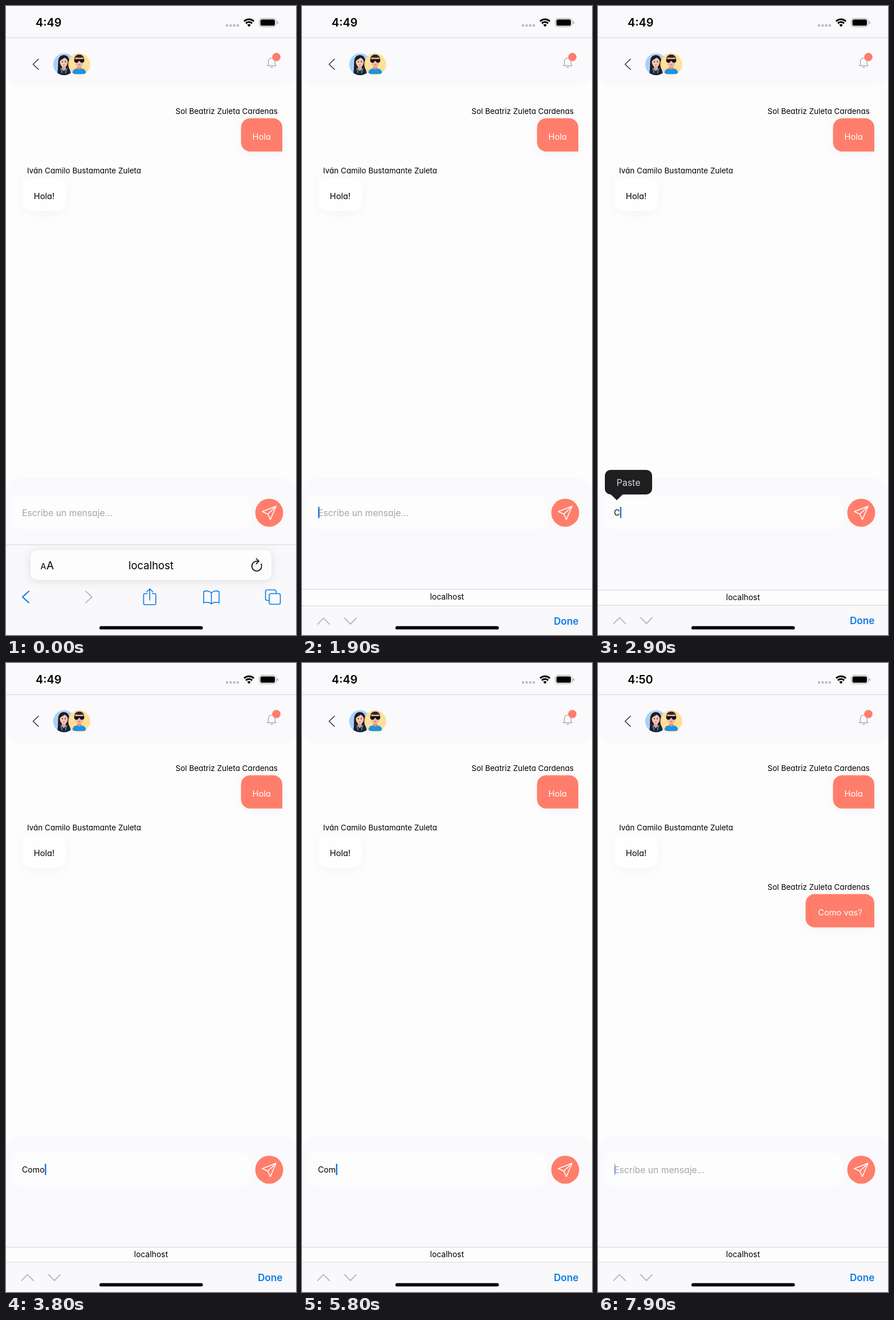
Animation of 509 by 1101 pixels, one loop 8 s. Source, as an HTML page:

```html
<!DOCTYPE html>
<html lang="es">
<head>
<meta charset="utf-8">
<title>Chat</title>
<style>
  html, body { margin: 0; width: 100%; height: 100%; overflow: hidden; background: #fefdfe; }
  svg { display: block; width: 100%; height: 100%; font-family: Inter, "Open Sans", sans-serif; }
  text { white-space: pre; }
  .app { font-feature-settings: "cv11"; }
  .name { font-size: 13.5px; }
  .msg { font-size: 14.7px; }
  .mid { text-anchor: middle; }
  .end { text-anchor: end; }
  .line { fill: none; stroke-width: 2; stroke-linecap: round; stroke-linejoin: round; }
  .thin { stroke-width: 1.6; }
  .blue { stroke: #0b7be8; }
  .grey { stroke: #bdbcc1; }
  .panel { fill: #faf9fb; }
  .coral { fill: #ff7e6b; }
  .bubble { filter: drop-shadow(0 4px 9px rgba(50, 40, 80, .05)); }
  .tip text { font-size: 16px; fill: #d4d4d6; }
  .tip { fill: #1f1f21; }
</style>
</head>
<body>
<svg viewBox="0 0 509 1101" preserveAspectRatio="none">
  <defs>
    <clipPath id="clipA"><circle cx="102" cy="102" r="19.2"/></clipPath>
    <clipPath id="clipB"><circle cx="128.5" cy="102" r="19.2"/></clipPath>
  </defs>
  <rect width="509" height="1101" fill="#fefdfe"/>

  <!-- status bar and header -->
  <path class="panel" d="M0 0h509v115a27 27 0 0 1-27 26H27a27 27 0 0 1-27-26z"/>
  <rect y="55" width="509" height="1" fill="#d6d5d8"/>
  <text id="clock" x="52" y="36" font-size="19.8" font-weight="600">4:49</text>
  <g fill="#b9b8bc">
    <circle cx="388" cy="34" r="2.2"/><circle cx="394.3" cy="34" r="2.2"/>
    <circle cx="400.6" cy="34" r="2.2"/><circle cx="406.9" cy="34" r="2.2"/>
  </g>
  <path d="M418 26.8a12 12 0 0 1 17 0M421 30.4a7.7 7.7 0 0 1 11 0" fill="none" stroke="#000" stroke-width="3"/>
  <path d="M426.5 36.4l-3.1-3.3a4.4 4.4 0 0 1 6.2 0z"/>
  <rect x="444.5" y="21.5" width="29.5" height="15" rx="4.5" fill="none" stroke="#acabaf"/>
  <rect x="446.5" y="23.5" width="25.5" height="11" rx="2.8"/>
  <path d="M475.5 26.5a2.5 2.5 0 0 1 0 5z" fill="#acabaf"/>

  <path class="line thin" d="M57 93l-9.5 9 9.5 9" stroke="#2b3848"/>

  <g clip-path="url(#clipA)">
    <rect x="82" y="82" width="40" height="40" fill="#a8d0fa"/>
    <path d="M90 118c2-8 1-14 1.500-20 .5-8 4-12 10-12s9.500 4 10 12c.5 6 0 12 2 20z" fill="#1d1c22"/>
    <path d="M90 123c0-8 4-12 12-12s13 4 13 12z" fill="#22232b"/>
    <path d="M98 104h7v7l-3.500 3-3.500-3z" fill="#e3a18a"/>
    <ellipse cx="101.500" cy="98" rx="7" ry="9" fill="#f4c4b2"/>
    <path d="M94 97c0-7 4-9.500 7.500-9.500s7.500 2.500 7.500 9.500c-1.500-3-3-5-6-6.500-2.500 2-6 3-9 6.500z" fill="#1d1c22"/>
    <path d="M98.200 97.500h1.600M103.400 97.500h1.600" stroke="#2b2226" stroke-width="1.800"/>
    <path d="M100 103h3.200" stroke="#b8584f"/>
    <path d="M96.500 108.500c0 4 1 6 2.500 9M106.500 108.500c0 4-1 6-2.500 9" fill="none" stroke="#2b8fe6" stroke-width="2"/>
  </g>
  <g clip-path="url(#clipB)">
    <rect x="109" y="82" width="40" height="40" fill="#ffdf99"/>
    <path d="M116.500 119c0-7 3-10 12-10s12 3 12 10z" fill="#1b93e4"/>
    <path d="M125 103h7v6.500l-3.500 2-3.500-2z" fill="#dd9579"/>
    <ellipse cx="128.500" cy="97" rx="7.600" ry="9.500" fill="#f2b89c"/>
    <path d="M120.500 94.500c-1-7 3-9.500 8-9.500s9 2.500 8 9.500l-2-4.500c-4 1-8 1-12 0z" fill="#31262a"/>
    <path d="M119.700 93h17.600v2.800a3.900 3.900 0 0 1-7.700.4h-2.200a3.900 3.900 0 0 1-7.700-.4z" fill="#111116"/>
    <path d="M126.500 102.800h4" stroke="#a9574b"/>
  </g>

  <path class="line" d="M458.800 104.500l1.700-2.500v-5a5.800 5.800 0 0 1 11.600 0v5l1.700 2.500zM464.500 107.300h3.600" stroke="#a6a8af" style="stroke-width:1.300"/>
  <circle class="coral" cx="474.500" cy="89.300" r="7.300"/>

  <!-- conversation -->
  <g class="app">
    <text class="name end" x="477" y="189">Sol Beatriz Zuleta Cardenas</text>
    <path class="bubble coral" d="M428.500 196.500h40.500a16 16 0 0 1 16 16v42.200h-56.500a16 16 0 0 1-16-16v-26.200a16 16 0 0 1 16-16z"/>
    <text class="msg mid" x="448.700" y="234" fill="#fff">Hola</text>

    <text class="name" x="37" y="293">Iván Camilo Bustamante Zuleta</text>
    <path class="bubble" fill="#fefefe" d="M28 300.500h60a18 18 0 0 1 18 18v22.500a18 18 0 0 1-18 18h-42a18 18 0 0 1-18-18z"/>
    <text class="msg mid" x="67" y="337.500">Hola!</text>

    <g id="reply">
      <text class="name end" x="477" y="397">Sol Beatriz Zuleta Cardenas</text>
      <path class="bubble coral" d="M380.300 404.500h88.700a16 16 0 0 1 16 16v42.200h-104.700a16 16 0 0 1-16-16v-26.200a16 16 0 0 1 16-16z"/>
      <text class="msg mid" x="425" y="442" fill="#fff">Como vas?</text>
    </g>
  </g>

  <!-- composer -->
  <path class="panel" d="M0 1101V853a27 27 0 0 1 27-27h455a27 27 0 0 1 27 27v248z"/>
  <rect x="10" y="857" width="420" height="59" rx="19" fill="#fefdfe"/>
  <g class="app">
    <text id="hint" x="28" y="892.500" font-size="15.700" fill="#a5a4a9">Escribe un mensaje...</text>
    <text id="draft" x="28" y="892" font-size="14.200"></text>
  </g>
  <rect id="caret" y="876.500" width="2.400" height="20" rx="1" fill="#1475dc"/>
  <circle class="coral" cx="462" cy="887" r="24.500"/>
  <path class="line thin" d="M474 875.500l-24 9.500 9.500 4.500 4.500 9.500zM474 875.500l-14.500 14" stroke="#fff"/>

  <!-- popups -->
  <g class="tip" id="paste">
    <path d="M22 812h63a10 10 0 0 1 10 10v23a10 10 0 0 1-10 10h-41.500l-10.500 10-10.500-10h-.5a10 10 0 0 1-10-10v-23a10 10 0 0 1 10-10z"/>
    <text class="mid" x="53.500" y="839.500">Paste</text>
  </g>
  <g class="tip" id="suggest">
    <path d="M35 812h67a10 10 0 0 1 10 10v23a10 10 0 0 1-10 10h-23l-10.500 10-10.500-10h-23a10 10 0 0 1-10-10v-23a10 10 0 0 1 10-10z"/>
    <text class="mid" x="68.500" y="839.500">Como</text>
  </g>

  <!-- browser bar -->
  <g id="bar">
    <rect y="943" width="509" height="240" fill="#f9f8fa"/>
    <rect id="strip" y="943" width="509" height="240" fill="#fefdfe"/>
    <rect y="942.500" width="509" height="1" fill="#d4d3d7"/>
  </g>
  <g id="capsule">
    <rect x="43" y="952.500" width="423" height="52" rx="12" fill="#fefdfe" style="filter:drop-shadow(0 2px 8px rgba(0,0,0,.11))"/>
    <text x="60.500" y="986" font-size="14.500">A</text>
    <text x="71" y="986" font-size="19">A</text>
    <path class="line thin" d="M447.800 976.500a8.600 8.600 0 1 1-7.800-4.700h3M439.300 967.200l4.600 4.600-4.600 4.600" stroke="#000"/>
  </g>
  <g id="tools" class="line">
    <path class="blue" d="M40 1024.500l-11 10 11 10"/>
    <path class="grey" d="M140 1024.500l11 10-11 10"/>
    <g class="blue thin">
      <path d="M248 1028.500h-4a2.500 2.500 0 0 0-2.500 2.500v14.500a2.500 2.500 0 0 0 2.500 2.500h16.500a2.500 2.500 0 0 0 2.500-2.500v-14.500a2.500 2.500 0 0 0-2.500-2.500h-4M252.300 1040v-19.500M247 1025.500l5.300-5.300 5.300 5.300"/>
      <path d="M360.500 1027.500c-3-4-10-4.500-13.500-2.500v20c4-2 10.500-1.500 13.500 1.500 3-3 9.500-3.500 13.500-1.500v-20c-3.500-2-10.500-1.500-13.500 2.500zv18.500"/>
      <path d="M462 1040.500h-3.500a3 3 0 0 1-3-3v-12.500a3 3 0 0 1 3-3h12.500a3 3 0 0 1 3 3v3.500"/>
      <rect x="462" y="1028.500" width="19.500" height="18.800" rx="3"/>
    </g>
  </g>
  <g id="site"><text class="mid" font-size="18.500">localhost</text></g>

  <!-- keyboard accessory -->
  <g id="accessory">
    <rect y="1049" width="509" height="110" fill="#f9f8fa"/>
    <rect y="1048.500" width="509" height="1" fill="#d4d3d7"/>
    <path class="line grey" d="M27.500 1081l10.300-10.500 10.300 10.500M74.700 1070.500l10.300 10.500 10.300-10.500"/>
    <text class="end" x="485.500" y="1082" font-size="17.200" font-weight="600" fill="#0b7be8">Done</text>
  </g>
  <rect x="164" y="1085.500" width="181.500" height="5.800" rx="2.900"/>
</svg>

<script>
  const LOOP = 8000, STEP = 100;
  const el = {};
  for (const id of ['clock', 'reply', 'hint', 'draft', 'caret', 'paste', 'suggest',
    'bar', 'strip', 'capsule', 'tools', 'site', 'accessory']) el[id] = document.getElementById(id);

  // [time, text in the field]; the first entry is the moment of focus
  const typing = [
    [1800, ''], [2900, 'C'], [3100, 'Co'], [3600, 'Com'], [3800, 'Como'],
    [4000, 'Com'], [4200, 'Comp'], [5800, 'Com'], [5900, 'Como'], [6000, 'Como '],
    [6100, 'Como v'], [6200, 'Como va'], [6300, 'Como vas'], [6400, 'Como vas?'], [7000, '']
  ];
  const blink = [1, 1, 1, 1, 1, .6, .3, 0, 0, .4];
  const pasteFade = [[0, 0], [2300, .35], [2400, .8], [2500, 1], [3000, .4], [3100, 0]];
  const suggestFade = [[0, 0], [5200, .28], [5300, 1], [5400, .45], [5500, 0]];

  const clamp = x => Math.min(1, Math.max(0, x));
  const last = (list, t) => list.filter(k => k[0] <= t).pop();
  const fade = (node, o) => node.setAttribute('opacity', clamp(o));
  const moveY = (node, y) => node.setAttribute('transform', `translate(0 ${y})`);

  function drawBar(t) {
    const e = 1 - (1 - clamp((t - 1500) / 500)) ** 2.5;
    moveY(el.bar, 79.5 * e);
    moveY(el.capsule, 57 * e);
    moveY(el.accessory, 56 * (1 - e));
    fade(el.strip, e);
    fade(el.capsule, 1 - 1.3 * e);
    fade(el.tools, 1 - 1.5 * e);
    el.site.setAttribute('transform', `translate(254.5 ${985.7 + 54.6 * e}) scale(${1 - .248 * e})`);
  }

  function drawField(t) {
    const [since, text] = last(typing, t) || [Infinity, ''];
    el.draft.textContent = text;
    fade(el.hint, text ? 0 : 1);
    el.caret.setAttribute('x', 28.3 + (text ? el.draft.getComputedTextLength() : 0));
    fade(el.caret, t < since ? 0 : blink[(t - since) / STEP % blink.length]);
  }

  function draw(t) {
    drawBar(t);
    drawField(t);
    fade(el.paste, last(pasteFade, t)[1]);
    fade(el.suggest, last(suggestFade, t)[1]);
    fade(el.reply, t < 7000 ? 0 : 1);
    el.clock.textContent = t < 6800 ? '4:49' : '4:50';
  }

  let start, shown;
  function tick(now) {
    start ??= now;
    const t = Math.floor((now - start) % LOOP / STEP) * STEP;
    if (t !== shown) draw(shown = t);
    requestAnimationFrame(tick);
  }
  draw(0);
  requestAnimationFrame(tick);
</script>
</body>
</html>
```
